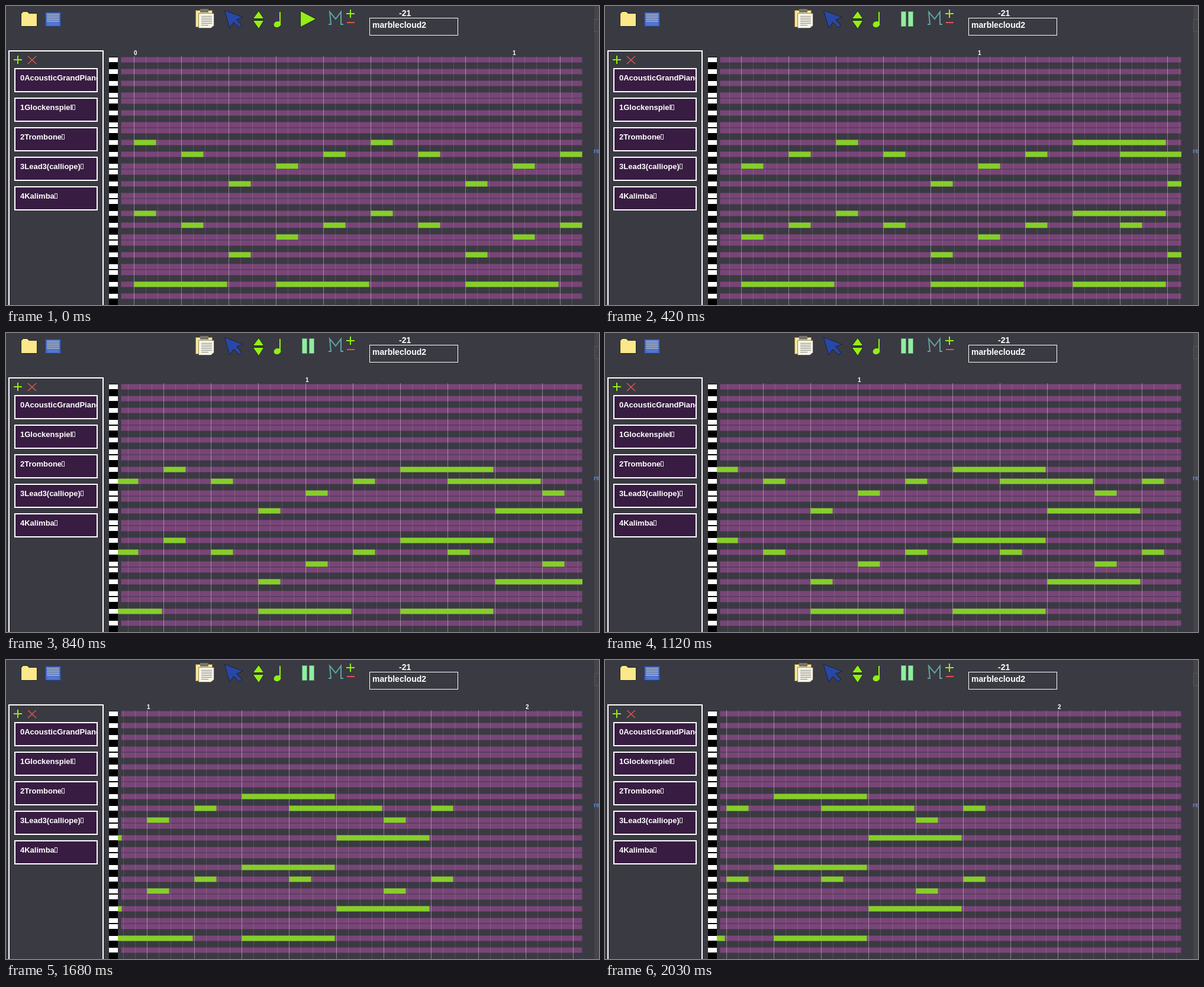
Recreate the animation shown at these times as an HTML page with a canvas. Size 1002 by 506 pixels, loop 2.1 s.

```html
<!DOCTYPE html>
<html lang="en">
<head>
<meta charset="utf-8">
<title>Piano roll</title>
<style>
  html, body { margin: 0; width: 100%; height: 100%; overflow: hidden; background: #3a3a42; }
  canvas { display: block; }
</style>
</head>
<body>
<canvas id="stage" width="1002" height="506"></canvas>
<script>
const ctx = document.getElementById('stage').getContext('2d');
const LOOP = 2100, STEP = 70;
const BACK = '#3a3a42', LIME = '#92f014', MINT = '#8eeea0', RED = '#e0584c', WHITE = '#fff', INK = '#1c1c24';
const UNIT = 80, ORIGIN = 216;
const LEFT = 189, GRID = 194, RIGHT = 974, TOP = 86, ROW = 10;

// Key points of the uneven playback: time in ms -> distance scrolled in px.
const SCROLL = [[70, 117], [630, 291], [1120, 429], [1470, 536], [1680, 618], [2030, 731]];

const ARPEGGIO = [14, 16, 21, 18, 16]; // row numbers, repeated three times
const OCTAVE = 12, BASS_ROW = 38;
const BLACK_KEYS = [1, 3, 5, 8, 10];
const INSTRUMENTS = ['0AcousticGrandPiano', '1Glockenspiel', '2Trombone', '3Lead3(calliope)', '4Kalimba'];

function rect(x, y, w, h, color) {
  ctx.fillStyle = color;
  ctx.fillRect(x, y, w, h);
}

// A bar whose outermost pixel blends into what lies below.
function softRect(x, y, w, h, color) {
  ctx.globalAlpha = 0.5;
  rect(x, y, w, h, color);
  ctx.globalAlpha = 1;
  rect(x + 1, y + 1, w - 2, h - 2, color);
}

function frame(x, y, w, h, width, color = WHITE) {
  ctx.strokeStyle = color;
  ctx.lineWidth = width;
  ctx.strokeRect(x + width / 2, y + width / 2, w - width, h - width);
}

function line(points, color, width, close = false) {
  ctx.beginPath();
  points.forEach(([x, y]) => ctx.lineTo(x, y));
  if (close) ctx.closePath();
  ctx.strokeStyle = color;
  ctx.lineWidth = width;
  ctx.stroke();
}

function poly(points, fill, stroke = INK) {
  line(points, stroke, 1.5, true);
  ctx.fillStyle = fill;
  ctx.fill();
}

function text(string, x, y, size, color = WHITE) {
  ctx.font = `bold ${size}px "Liberation Sans", Arial, sans-serif`;
  ctx.fillStyle = color;
  ctx.fillText(string, x, y);
}

function clip(x, y, w, h, draw) {
  ctx.save();
  ctx.beginPath();
  ctx.rect(x, y, w, h);
  ctx.clip();
  draw();
  ctx.restore();
}

function plus(x, y) {
  rect(x - 7, y - 1, 14, 2, LIME);
  rect(x - 1, y - 7, 2, 14, LIME);
}

function drawFiles() {
  poly([[26, 34], [26, 13], [29, 10], [36, 10], [39, 13], [52, 13], [52, 34]], '#fbe88a');
  rect(66, 10, 27, 25, '#4468c4');
  frame(66, 10, 27, 25, 1, '#2c3c78');
  for (let y = 13; y < 26; y += 3) rect(69, y, 21, 2, '#9ca8b8');
  rect(70, 28, 19, 5, '#5078d4');
}

function drawClipboard() {
  rect(320, 7, 29, 29, '#f6e698');
  frame(320, 7, 29, 29, 1, '#8c783c');
  rect(328, 5, 14, 6, '#77746a');
  poly([[326, 13], [351, 13], [351, 33], [346, 37], [326, 37]], '#f6f4e6', '#6c6858');
  for (let y = 17; y < 35; y += 3) rect(330, y, y > 30 ? 12 : 18, 1, '#888');
}

function drawToolbar(playing) {
  drawFiles();
  drawClipboard();
  poly([[370, 8], [399, 19], [389, 23], [398, 33], [394, 36], [385, 27], [378, 36]], '#2848a8');
  poly([[427, 9], [435, 21], [418, 21]], LIME);
  poly([[418, 25], [435, 25], [427, 38]], LIME);

  ctx.beginPath();
  ctx.ellipse(458.5, 31, 6, 5, -0.3, 0, 7);
  ctx.fillStyle = LIME;
  ctx.fill();
  rect(462, 10, 2, 21, LIME);

  if (playing) {
    softRect(500, 9, 9, 26, MINT);
    softRect(512, 9, 9, 26, MINT);
  } else {
    poly([[498, 9], [523, 22], [498, 35]], LIME);
  }

  line([[545, 31], [549, 31], [547, 10], [557, 22], [566, 10], [566, 31], [570, 31]], '#60a4a4', 2);
  plus(582, 13);
  rect(576, 27, 13, 2, RED);

  text('-21', 664, 17, 14);
  frame(614, 20, 150, 30, 1);
  text('marblecloud2', 619, 37, 14);
}

function drawInstruments() {
  frame(4, 75, 161, 440, 2);
  plus(20, 91);
  line([[37, 85], [51, 98]], RED, 1.5);
  line([[51, 85], [37, 98]], RED, 1.5);
  INSTRUMENTS.forEach((name, i) => {
    const y = 105 + i * 50;
    rect(14, y, 141, 41, '#381c42');
    frame(14, y, 141, 41, 2);
    clip(14, y, 141, 41, () => {
      text(name, 24, y + 21, 13);
      frame(24 + Math.round(ctx.measureText(name).width), y + 12, 5, 9, 1, '#ddd');
    });
  });
}

function drawRows() {
  rect(174, TOP, 15, 420, '#000');
  for (let i = 0; i < 42; i++) {
    if (BLACK_KEYS.includes(i % OCTAVE)) continue;
    softRect(GRID, TOP + i * ROW, RIGHT - GRID, ROW, '#794578');
    rect(174, TOP + i * ROW + 1, 15, 8, WHITE);
  }
}

function drawGrid(start) {
  for (let i = 0, x = start; x < RIGHT; x = start + ++i * UNIT / 4) {
    if (x < GRID) continue;
    rect(x, TOP - 1, 1, 421, `rgba(255,255,255,${i % 4 ? 0.12 : 0.38})`);
    if (i % 32 === 0) text(i / 32, x, 83, 10);
  }
}

function drawNotes(start) {
  const note = (unit, row, held) =>
    softRect(start + unit * UNIT, TOP + row * ROW, held ? 158 : 38, ROW, '#86ce2a');

  for (let unit = 0; unit < 15; unit++) {
    const row = ARPEGGIO[unit % 5];
    const held = unit >= 10 && unit <= 12;
    note(unit, row, held);
    note(unit, row + OCTAVE, held && unit % 2 === 0);
  }
  for (let k = 0; k < 4; k++) note(Math.floor(k * 3.5), BASS_ROW, true);
}

function drawRoll(scroll) {
  const start = ORIGIN - scroll;
  drawRows();
  drawGrid(start);
  clip(LEFT, TOP, RIGHT - LEFT, 420, () => drawNotes(start));
}

function drawEdge() {
  rect(994, 0, 8, 506, '#44444a');
  frame(994, 22, 20, 22, 1, '#55555c');
  text('re', 993, 249, 11, '#6488d0');
}

function scrollAt(t) {
  if (t < SCROLL[0][0]) return 0;
  const next = Math.max(1, SCROLL.findIndex(([time]) => time >= t));
  const [t0, s0] = SCROLL[next - 1], [t1, s1] = SCROLL[next];
  return Math.round(s0 + (s1 - s0) * (t - t0) / (t1 - t0));
}

function render(now) {
  const t = Math.floor((now % LOOP) / STEP) * STEP;
  rect(0, 0, 1002, 506, BACK);
  drawToolbar(t > 0);
  drawInstruments();
  drawRoll(scrollAt(t));
  drawEdge();
}

const begin = performance.now();
function tick() {
  render(performance.now() - begin);
  requestAnimationFrame(tick);
}
tick();
</script>
</body>
</html>
```
